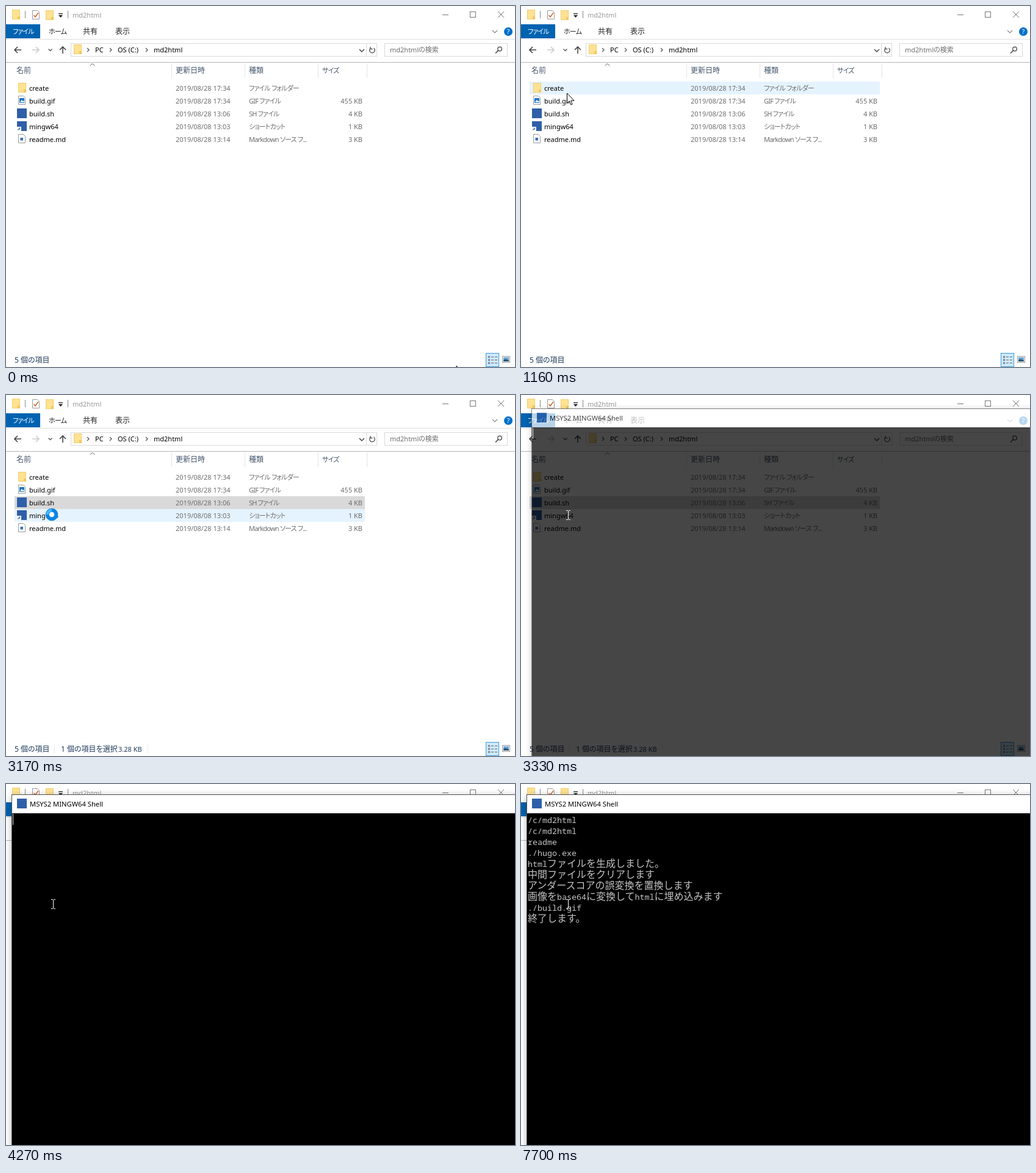
Write an HTML page that moves like this. It is 834 by 592 pixels and loops after 8 s.

```html
<!DOCTYPE html>
<html lang="ja">
<head>
<meta charset="utf-8">
<title>md2html</title>
<style>
html, body { margin: 0; width: 100%; height: 100%; overflow: hidden; background: #fff; }
svg { display: block; width: 100%; height: 100%; }
text { font: 11px "Noto Sans", "Noto Sans CJK JP", sans-serif; font-feature-settings: "palt"; white-space: pre; }
.kana { letter-spacing: -.8px; }
.kanji { font-size: 12px; }
.term text { font: 300 16px "Noto Sans CJK JP", sans-serif; font-feature-settings: normal; fill: #c4c4c4; }
.term tspan { font: 13.333px "Noto Sans Mono", "DejaVu Sans Mono", monospace; }
</style>
</head>
<body>
<svg id="stage" viewBox="0 0 834 592" preserveAspectRatio="none"></svg>
<script>
const stage = document.getElementById('stage');
const LOOP = 8000, ROW = 21, TOP = 124;

// Markup helpers
const text = (x, y, s, fill = '#000', cls = '', extra = '') =>
  `<text x="${x}" y="${y}" fill="${fill}" class="${cls}" ${extra}>${s}</text>`;
const rect = (x, y, w, h, fill, extra = '') =>
  `<rect x="${x}" y="${y}" width="${w}" height="${h}" fill="${fill}" ${extra}/>`;
const line = (d, color, width = 1) =>
  `<path d="${d}" fill="none" stroke="${color}" stroke-width="${width}"/>`;
const box = (x, y, w, h, color, fill = 'none') =>
  rect(x + .5, y + .5, w, h, fill, `stroke="${color}"`);
const chevron = (x, y) => line(`M${x} ${y - 3}l3 3-3 3`, '#555', 1.3);

const folder = (x, y) => rect(x + .5, y + .5, 12, 15, '#ffe293', 'stroke="#f3cd6b"') +
  `<path d="M${x + 9} ${y + 16}v-5h4v5z" fill="#f5c85a"/>`;
const page = (x, y) => `<path d="M${x + .5} ${y + .5}h8l3 3v11h-11z" fill="#fff" stroke="#9a9a9a"/>`;
const appIcon = (x, y) => rect(x, y, 16, 16, '#2f5fa8');
const icons = {
  folder: y => folder(20, y + 2),
  image: y => page(20, y + 2) + rect(22, y + 6, 8, 8, '#1c78c8') +
    `<path d="M23 ${y + 13}l2.500-4 2 2 1-1 1.500 3z" fill="#fff"/>`,
  app: y => appIcon(18, y + 2),
  link: y => appIcon(18, y + 2) + rect(18, y + 11, 7, 7, '#fff') +
    line(`M19.500 ${y + 17}q0-3 3-3m-1.500-2l2 2-2 2`, '#2f5fa8'),
  note: y => page(20, y + 2) + rect(23.5, y + 8, 4.5, 4.5, '#3a6fb5')
};

const files = [
  ['folder', 'create', '2019/08/28 17:34', 'ファイル フォルダー', ''],
  ['image', 'build.gif', '2019/08/28 17:34', 'GIF ファイル', '455 KB'],
  ['app', 'build.sh', '2019/08/28 13:06', 'SH ファイル', '4 KB'],
  ['link', 'mingw64', '2019/08/08 13:03', 'ショートカット', '1 KB'],
  ['note', 'readme.md', '2019/08/28 13:14', 'Markdown ソース フ...', '3 KB']
];

function titleBar() {
  return folder(10, 6) + folder(65, 7) +
    line('M31.500 8v12M101.500 8v12', '#888') +
    page(43, 7) + line('M45.500 15l2.500 3 5-7', '#d0662c', 1.5) +
    rect(86, 12, 7, 1.3, '#222') + '<path d="M86 15h7l-3.500 4z" fill="#222"/>' +
    text(109, 19, 'md2html', '#999') +
    line('M715 14.500h10M806 9l10 10M816 9l-10 10', '#777') + box(760, 9, 9, 9, '#777');
}

function ribbon() {
  return rect(0, 30, 56, 23, '#0063b1') + text(11, 46, 'ファイル', '#fff', 'kana') +
    text(70, 46, 'ホーム', '#222', 'kana') + text(126, 46, '共有', '#222', 'kanji') +
    text(179, 46, '表示', '#222', 'kanji') +
    line('M797 40l4 4 4-4', '#888', 1.2) +
    '<circle cx="823" cy="42" r="7" fill="#0070c9"/>' +
    text(823, 46, '?', '#fff', '', 'text-anchor="middle" font-weight="700"') +
    line('M0 54.500H834', '#dcdddf');
}

function addressBar() {
  return line('M25 72H14m5-5l-5 5 5 5', '#444', 1.6) +
    line('M43 72h11m-5-5l5 5-5 5', '#ccc', 1.6) +
    line('M69.500 70.500l3 3 3-3', '#555', 1.3) +
    line('M93 78V67m-5 5l5-5 5 5', '#444', 1.6) +
    box(106, 61, 501, 21, '#d9d9d9') + line('M590.500 61v21', '#d9d9d9') +
    folder(111, 63) + chevron(133, 72) + text(146, 76, 'PC') +
    chevron(170, 72) + text(183, 76, 'OS (C:)') +
    chevron(229, 72) + text(242, 76, 'md2html') +
    line('M579 71l4 4 4-4', '#444', 1.5) +
    line('M602.500 69a4.300 4.300 0 1 1-5 0M597 67v3.500h3.500', '#555', 1.4) +
    box(620, 61, 201, 21, '#d9d9d9') + text(629, 76, 'md2htmlの検索', '#6d6d6d') +
    '<circle cx="809" cy="70.500" r="3.300" fill="none" stroke="#444" stroke-width="1.300"/>' +
    line('M806.500 73l-4.500 4.500', '#444', 1.6) +
    line('M0 92.500H834', '#b5b5b5');
}

function listing() {
  const head = '#45566c', soft = '#6d6d6d';
  const rows = files.map(([icon, name, date, kind, size], i) => {
    const y = TOP + i * ROW, base = y + 15;
    return icons[icon](y) + text(38, base, name) + text(278, base, date, soft) +
      text(398, base, kind, soft, 'kana') + text(584, base, size, soft, '', 'text-anchor="end"');
  });
  return text(17, 110, '名前', head, 'kanji') + text(278, 110, '更新日時', head, 'kanji') +
    text(398, 110, '種類', head, 'kanji') + text(518, 110, 'サイズ', head, 'kana') +
    line('M137.500 98l4-3.500 4 3.500', '#666') +
    line('M271.500 94v24M391.500 94v24M511.500 94v24M591.500 94v24', '#e5e5e5') +
    rows.join('');
}

function statusBar() {
  const ink = '#1e395b';
  return text(14, 585, '5 個の項目', ink, 'kanji') +
    `<g id="picked">${text(90, 585, '1 個の項目を選択', ink, 'kanji')}${text(184, 585, '3.28 KB', ink)}
      ${line('M79.500 573v15M232.500 573v15', '#ececec')}</g>` +
    box(786, 569, 21, 22, '#3a9bdc', '#cce8ff') +
    [575, 580, 585].map(y => box(790, y - 1, 2, 2, '#777') +
      line(`M795 ${y + .5}h4m2 0h4`, '#666')).join('') +
    box(813, 574, 12, 10, '#999', '#fff') + rect(815, 576, 9, 7, '#6fa8d6') +
    '<path d="M815 583v-3l4-1 5 2v2z" fill="#2c5878"/>';
}

// Console output: [time shown, row, content]
const output = [
  [4500, '/c/md2html'], [4500, '/c/md2html'], [4500, 'readme'],
  [4820, './hugo.exe'],
  [5120, 'htmlファイルを生成しました。'], [5120, '中間ファイルをクリアします'],
  [5120, 'アンダースコアの誤変換を置換します'],
  [5440, '画像をbase64に変換してhtmlに埋め込みます'],
  [5820, './build.gif'], [6070, '終了します。']
];
const mono = s => s.replace(/[!-~]+/g, '<tspan>$&</tspan>');

function terminal() {
  return rect(10, 17, 900, 640, '#000', 'filter="url(#shadow)"') +
    rect(9, 17, 900, 640, '#555') + rect(10, 18, 900, 30, '#fff') + rect(10, 48, 900, 600, '#000') +
    appIcon(18, 24) + text(39, 37, 'MSYS2 MINGW64 Shell', '#000', '', 'style="font-size:11.2px"') +
    `<g class="term">${output.map(([, s], i) =>
      `<text class="out" x="11" y="${64 + i * 18}">${mono(s)}</text>`).join('')}</g>` +
    rect(11, 49, 1, 18, '#ddd', 'id="caret"');
}

stage.innerHTML = `
  <defs><filter id="shadow" x="-5%" y="-5%" width="110%" height="110%">
    <feDropShadow dx="0" dy="3" stdDeviation="6" flood-opacity=".35"/></filter></defs>
  ${rect(0, 0, 834, 592, '#fff')}
  ${rect(14, 0, 574, ROW, '#e5f3ff', 'id="hover"')}
  ${rect(14, TOP + 2 * ROW, 574, ROW, '#cce8ff', 'id="selected"')}
  ${titleBar()}${ribbon()}${addressBar()}${listing()}${statusBar()}
  <g id="ghost" opacity=".3">${rect(-42, -90, 96, 96, '#2f5fa8')}</g>
  <g id="shell">${terminal()}</g>
  <path id="arrow" d="M0 0V16.500L3.800 13 6.300 19 8.600 18 6.100 12.200H11.500Z" fill="#fff" stroke="#000"/>
  <g id="busy" transform="translate(75 196)">
    <circle r="7.300" fill="#fff" stroke="#0b84e4" stroke-width="6"/>
    <path d="M-7.300 0A7.300 7.300 0 0 1 0-7.300" fill="none" stroke="#4db8ff" stroke-width="4"/></g>
  <path id="beam" d="M74 189.500h2.500l1 1 1-1H81M77.500 190v14M74 204.500h2.500l1-1 1 1H81" fill="none" stroke="#fff"/>`;

const el = Object.fromEntries([...stage.querySelectorAll('[id]')].map(n => [n.id, n]));
const lines = [...stage.querySelectorAll('.out')];
const show = (node, on) => node.setAttribute('visibility', on ? 'visible' : 'hidden');
const clamp = v => Math.min(1, Math.max(0, v));
const move = (node, x, y) => node.setAttribute('transform', `translate(${x} ${y})`);

// Pointer legs: start, end, steps, from, to
const legs = [
  [70, 830, 11, [738, 590], [82, 132]],
  [920, 1160, 4, [82, 132], [75.5, 143]],
  [1240, 1470, 4, [75.5, 143], [77, 172]],
  [1780, 2100, 5, [77, 172], [76, 193]]
];

function pointer(t) {
  let at = legs[0][3];
  for (const [start, end, steps, a, b] of legs) {
    if (t < start) break;
    const step = Math.floor((t - start) / (end - start) * (steps - 1) + 1.001);
    const p = clamp(step / steps), e = p * p * (3 - 2 * p);
    at = a.map((v, i) => v + (b[i] - v) * e);
  }
  return at;
}

function drawExplorer(t) {
  const [x, y] = pointer(t);
  const row = Math.floor((y - TOP) / ROW);
  const dropped = t >= 2710;
  show(el.hover, x < 588 && row >= 0 && row < files.length && t < 3250);
  el.hover.setAttribute('y', TOP + row * ROW);
  show(el.selected, t >= 1780);
  el.selected.setAttribute('fill', dropped ? '#d9d9d9' : '#cce8ff');
  show(el.picked, t >= 1780);
  show(el.ghost, t >= 2020 && !dropped);
  move(el.ghost, x, y);
  show(el.arrow, !dropped);
  move(el.arrow, x, y);
  show(el.busy, dropped && t < 3250);
}

function drawShell(t) {
  const p = clamp(Math.floor((t - 3170) / 80) / 4), rest = 1 - p;
  show(el.beam, p > 0);
  el.shell.setAttribute('opacity', 1 - rest ** 1.84);
  move(el.shell, 32 * rest * rest, 20 * rest * rest);
  let count = 0;
  output.forEach(([at], i) => {
    const on = t >= at;
    lines[i].setAttribute('display', on ? 'inline' : 'none');
    count += on;
  });
  const off = (t >= 3720 && t < 4270) || (t >= 6620 && t < 7150) || t >= 7700;
  el.caret.setAttribute('y', 49 + count * 18);
  el.caret.setAttribute('opacity', off ? 0 : 1);
}

function draw(now) {
  const t = now % LOOP;
  drawExplorer(t);
  drawShell(t);
}

const began = performance.now();
function tick() {
  draw(performance.now() - began);
  requestAnimationFrame(tick);
}
tick();
</script>
</body>
</html>
```
